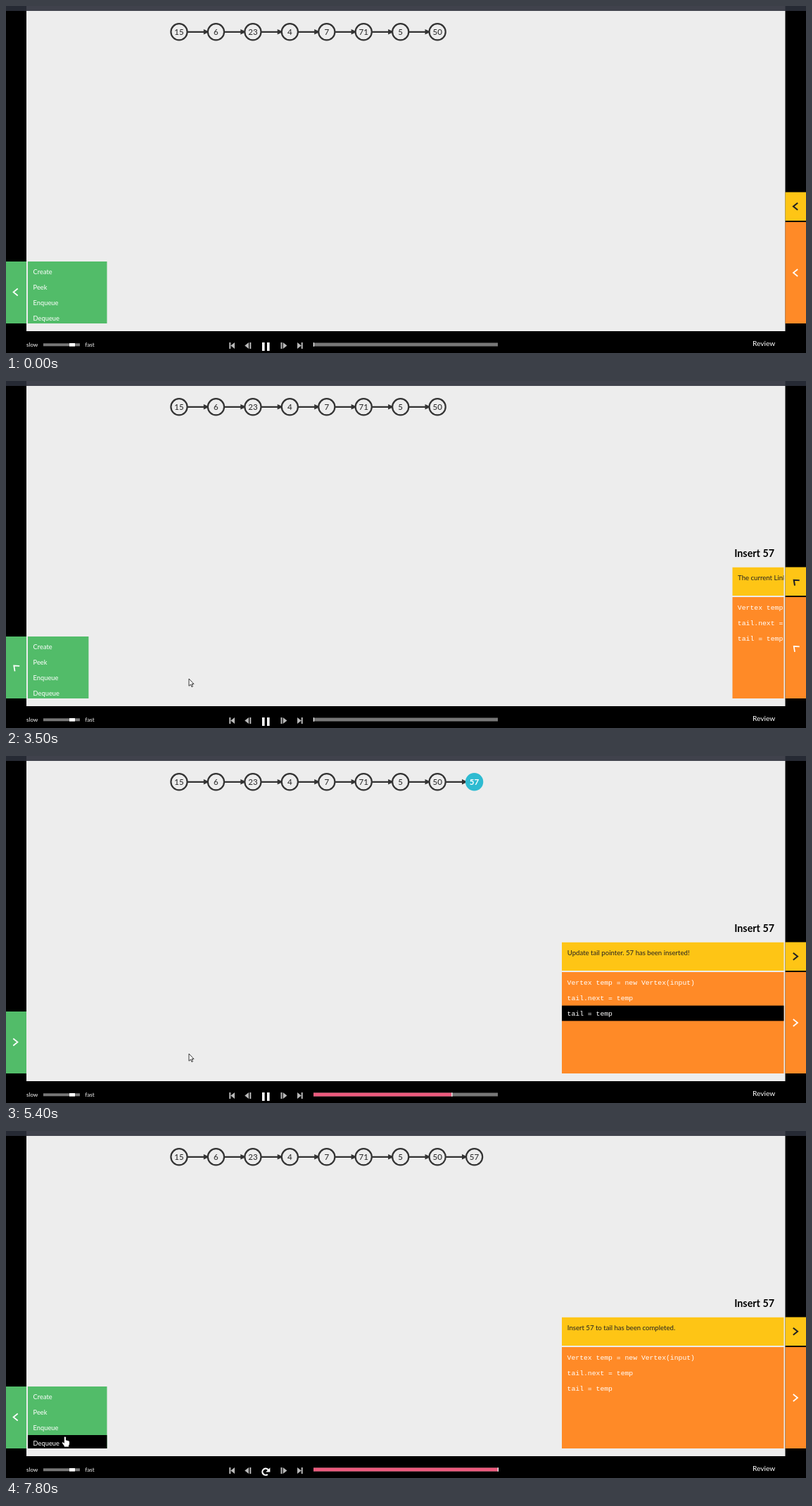
These frames come from a looping animation (1137 by 493 pixels, 8000 ms). An HTML page:

```html
<!DOCTYPE html>
<html lang="en">
<head>
<meta charset="utf-8">
<title>Linked list: insert at tail</title>
<style>
  html, body { margin: 0; width: 100%; height: 100%; overflow: hidden; background: #000; }
  svg { display: block; }
  svg svg { overflow: hidden; }
  text { font-family: Lato, "Open Sans", sans-serif; font-size: 9.3px; fill: #fff; white-space: pre; }
  .code text { font-family: "Liberation Mono", monospace; font-size: 9.75px; }
  .node { font-size: 11.6px; font-weight: 500; text-anchor: middle; fill: #333; }
  .chevron { fill: none; stroke: #fff; stroke-width: 1.7; }
  .icon { fill: #b8b8b8; }
</style>
</head>
<body>
<svg id="stage" width="1137" height="493" viewBox="0 0 1137 493">
  <rect width="1137" height="493"/>
  <rect width="1137" height="7" fill="#262a34"/>
  <rect x="29" width="1078.5" height="7" fill="#40424c"/>
  <rect x="29" y="7" width="1078.5" height="455" fill="#ededed"/>

  <g id="list"></g>

  <rect y="363" width="29" height="88" fill="#52bc69"/>
  <rect x="1107.5" y="264.5" width="29.5" height="40.5" fill="#fec515"/>
  <rect x="1107.5" y="307" width="29.5" height="144" fill="#ff8a27"/>
  <path class="chevron" data-x="13.5" data-y="406.5"/>
  <path class="chevron" data-x="1122" data-y="284.8" style="stroke:#222;stroke-width:2.1"/>
  <path class="chevron" data-x="1122" data-y="379"/>

  <svg id="menu" x="31" y="363" width="112.5" height="88">
    <rect width="113" height="88" fill="#52bc69"/>
    <rect id="hover" width="113" height="22"/>
    <text x="7.6" y="18">Create</text>
    <text x="7.6" y="40">Peek</text>
    <text x="7.6" y="62">Enqueue</text>
    <text x="7.6" y="84">Dequeue</text>
  </svg>

  <g id="field">
    <rect x="146" y="411.5" width="107.5" height="15.5"/>
    <rect id="go" x="253.5" y="411.5" width="13.5" height="15.5"/>
    <text x="147" y="422.8">57</text>
    <text x="253.8" y="422.5">GO</text>
  </g>

  <g id="panels">
    <text x="1092" y="250" text-anchor="end" style="font-size:14.3px;font-weight:700;fill:#000">Insert 57</text>
    <svg class="panel" y="264.5" height="40.5">
      <rect width="316" height="41" fill="#fec515"/>
      <text id="status" x="7.8" y="18" style="font-size:9.6px;fill:#222"></text>
    </svg>
    <svg class="panel code" y="307" height="144">
      <rect width="316" height="144" fill="#ff8a27"/>
      <rect id="line" width="316" height="21.8"/>
      <text x="7.6" y="17.8">Vertex temp = new Vertex(input)</text>
      <text x="7.6" y="39.5">tail.next = temp</text>
      <text x="7.6" y="61.5">tail = temp</text>
    </svg>
  </g>

  <text x="29" y="483.5" style="font-size:8.1px">slow</text>
  <text x="112.5" y="483.5" style="font-size:8.1px">fast</text>
  <rect x="53" y="479.3" width="52" height="4" fill="#777"/>
  <rect x="90" y="479" width="8" height="4.6" fill="#fff"/>
  <text x="1061" y="483" style="font-size:10.2px">Review</text>

  <path class="icon" d="M317.3 478h2v9h-2zM325 478v9l-5.7-4.5z"/>
  <path class="icon" d="M345 478v9l-5.7-4.5zM346.3 478h2v9h-2z"/>
  <path class="icon" d="M390.5 478h2v9h-2zM393.7 478v9l5.7-4.5z"/>
  <path class="icon" d="M414 478v9l5.7-4.5zM419.7 478h2v9h-2z"/>
  <path id="pause" fill="#fff" d="M364 478h3.6v12h-3.6zM371 478h3.6v12h-3.6z"/>
  <path id="play" fill="#fff" d="M364 477.8v12.2l11-6.1z"/>
  <g id="replay">
    <path d="M371.8 487.8A4.6 4.6 0 1 1 372.6 481.3" fill="none" stroke="#fff" stroke-width="2.2"/>
    <path d="M375.4 478.3v6.2h-6.2z" fill="#fff"/>
  </g>
  <rect x="437" y="478.5" width="262" height="5" fill="#777"/>
  <rect id="bar" x="437" y="478.5" height="5" fill="#ed5a7d"/>
  <rect id="mark" y="478.2" width="1.2" height="5.6" fill="#fff"/>

  <path id="cursor" stroke-width=".9" stroke-linejoin="round"/>
</svg>

<script>
const LOOP = 8000, STEP = 100;
const INK = [51, 51, 51], PAPER = [237, 237, 237], WHITE = [255, 255, 255];
const ORANGE = [255, 138, 39], BLUE = [46, 187, 209];
const OPEN_AT = 3372, SLIDE = 400, REOPEN_AT = 7272;
const NODE_Y = 36.8, GAP = 52.45;

const POINTERS = {
  arrow: { d: 'M0 0V10.3L2.4 8.1L4 11.6L5.5 10.9L4 7.5H7Z', fill: '#fff', stroke: '#222' },
  hand: { d: 'M-1.5 1.4a1.4 1.4 0 0 1 2.9 0V5l3.6.9q1.4.4 1.4 1.8V10q0 1.8-1 3V15H-1.5V13.6L-4.2 9.8' +
             'q-.6-1.3.4-1.8t1.8.6l.5.7z', fill: '#fff', stroke: '#111' },
  beam: { d: 'M-2 0H2M0 0V11M-2 11H2', fill: 'none', stroke: '#fff' }
};

// Pointer stops: time, x, y
const PATH = [
  [200, 102, 117], [300, 60, 210], [500, 60, 210], [1000, 80, 416], [1600, 80, 416],
  [2300, 260, 423], [5500, 260, 423], [5600, 247, 421], [5700, 122, 413], [5800, 4, 406],
  [6100, 4, 406], [6400, 19, 408], [7300, 19, 408], [7800, 84, 434]
];

const STATES = [
  { at: 0, text: 'The current LinkedList' },
  { at: 4000, text: 'Create new vertex to store value 57.' },
  { at: 4500, text: 'tail.next points to new vertex. Inserting 57 ...' },
  { at: 5100, text: 'Update tail pointer. 57 has been inserted!' },
  { at: 5600, text: 'Insert 57 to tail has been completed.' }
];

const $ = id => document.getElementById(id);
const set = (el, attrs) => { for (const k in attrs) el.setAttribute(k, attrs[k]); };
const show = (el, on) => { el.style.display = on ? '' : 'none'; };
const ramp = (t, from, length) => Math.min(1, Math.max(0, (t - from) / length));
const swing = p => 0.5 - Math.cos(Math.PI * p) / 2;
const mix = (a, b, p) => a.map((v, i) => v + (b[i] - v) * p);
const rgb = c => `rgb(${c.map(Math.round)})`;
const nodeX = i => 246 + GAP * i;

function add(tag, attrs, text = '') {
  const el = document.createElementNS('http://www.w3.org/2000/svg', tag);
  set(el, attrs);
  el.textContent = text;
  return $('list').appendChild(el);
}

function addNode(i, value) {
  const circle = add('circle', {
    cx: nodeX(i), cy: NODE_Y, r: 11.6, fill: rgb(PAPER), stroke: rgb(INK), 'stroke-width': 2.2
  });
  const label = add('text', { class: 'node', x: nodeX(i), y: NODE_Y + 4 }, value);
  return { circle, label };
}

function addEdge(i) {
  const line = add('path', { 'stroke-width': 2.2 });
  drawEdge(line, i, 1, INK);
  return line;
}

function drawEdge(line, i, p, color) {
  const start = nodeX(i) + 12, tip = start + (GAP - 23) * p, neck = Math.max(start, tip - 5.5);
  set(line, {
    d: `M${start} ${NODE_Y}H${neck}V${NODE_Y - 2}L${tip - 1} ${NODE_Y}L${neck} ${NODE_Y + 2}V${NODE_Y}`,
    stroke: rgb(color), fill: rgb(color)
  });
}

const values = [15, 6, 23, 4, 7, 71, 5, 50];
values.slice(1).forEach((_, i) => addEdge(i));
const newEdge = addEdge(values.length - 1);
values.forEach((value, i) => addNode(i, value));
const newNode = addNode(values.length, 57);
const chevrons = document.querySelectorAll('.chevron');
const panels = document.querySelectorAll('.panel');
chevrons.forEach(el => set(el, { d: 'M3.2 -5L-3 0L3.2 5' }));

function pointerAt(t) {
  const next = PATH.findIndex(stop => stop[0] > t);
  if (next < 0) return PATH[PATH.length - 1].slice(1);
  if (next === 0) return null;
  const [t0, ...from] = PATH[next - 1], [t1, ...to] = PATH[next];
  return mix(from, to, (t - t0) / (t1 - t0));
}

function drawPointer(t, menuOpen, fieldOn) {
  const at = pointerAt(t);
  show($('cursor'), at);
  show($('hover'), false);
  set($('go'), { fill: '#52bc69' });
  if (!at) return;
  const [x, y] = at;
  const overMenu = menuOpen > 0 && x >= 31 && x < 31 + 112.5 * menuOpen && y >= 366 && y < 451;
  const overTab = x < 29 && y > 363;
  const overGo = fieldOn && x >= 253.5;
  const overInput = fieldOn && x >= 146 && !overGo;
  if (overMenu) {
    show($('hover'), true);
    set($('hover'), { y: 3 + 22 * Math.floor((y - 366) / 22) });
  }
  if (overGo) set($('go'), { fill: '#000' });
  const kind = overInput ? 'beam' : overMenu || overTab || overGo ? 'hand' : 'arrow';
  set($('cursor'), { ...POINTERS[kind], transform: `translate(${x} ${y})` });
}

function drawNewNode(t) {
  const toBlue = ramp(t, 5000, 300), toPlain = ramp(t, 5500, 300);
  const fill = mix(mix(ORANGE, BLUE, t < 5100 ? 0 : toBlue), PAPER, toPlain);
  const stroke = mix(mix(ORANGE, BLUE, t < 5100 ? 0 : toBlue), INK, toPlain);
  const opacity = ramp(t, 3900, 300);
  set(newNode.circle, { fill: rgb(fill), stroke: rgb(stroke), opacity });
  set(newNode.label, { opacity });
  newNode.label.style.fill = rgb(mix(WHITE, INK, toPlain));
  newNode.label.style.fontWeight = toPlain < 1 ? 700 : 500;
  show(newEdge, t > 4500);
  drawEdge(newEdge, values.length - 1, swing(ramp(t, 4500, 500)), t < 5100 ? ORANGE : INK);
}

function draw(time) {
  const t = Math.floor((time % LOOP) / STEP) * STEP;
  // The slide pauses shortly before it ends
  const slideTime = t >= 3700 && t < 3900 ? 3700 : t;
  const opened = swing(ramp(slideTime, OPEN_AT, SLIDE));
  const reopened = swing(ramp(t, REOPEN_AT, SLIDE));
  const menuOpen = 1 - opened + reopened;

  set($('menu'), { width: 112.5 * menuOpen });
  show($('menu'), menuOpen > 0);
  panels.forEach(el => set(el, { x: 1105.5 - 315.5 * opened, width: 315.5 * opened }));
  show($('panels'), opened > 0);
  chevrons.forEach((el, i) => {
    const turn = 180 * (i ? opened : opened + reopened);
    set(el, { transform: `translate(${el.dataset.x} ${el.dataset.y}) rotate(${turn})` });
  });

  const fieldOn = t >= 1500 && t < 3400;
  show($('field'), fieldOn);
  set($('field'), { opacity: ramp(t, 1400, 200) });

  const step = STATES.filter(s => s.at <= t).length - 1;
  $('status').textContent = STATES[step].text;
  show($('line'), step > 0 && step < 4);
  set($('line'), { y: 4 + 21.8 * (step - 1) });
  set($('bar'), { width: 65.5 * step });
  set($('mark'), { x: 436.8 + 65.5 * step });
  show($('pause'), step < 4);
  show($('play'), step === 4 && t < 7300);
  show($('replay'), t >= 7300);

  drawNewNode(t);
  drawPointer(t, menuOpen, fieldOn);
}

const start = performance.now();
function tick() {
  draw(performance.now() - start);
  requestAnimationFrame(tick);
}
tick();
</script>
</body>
</html>
```
